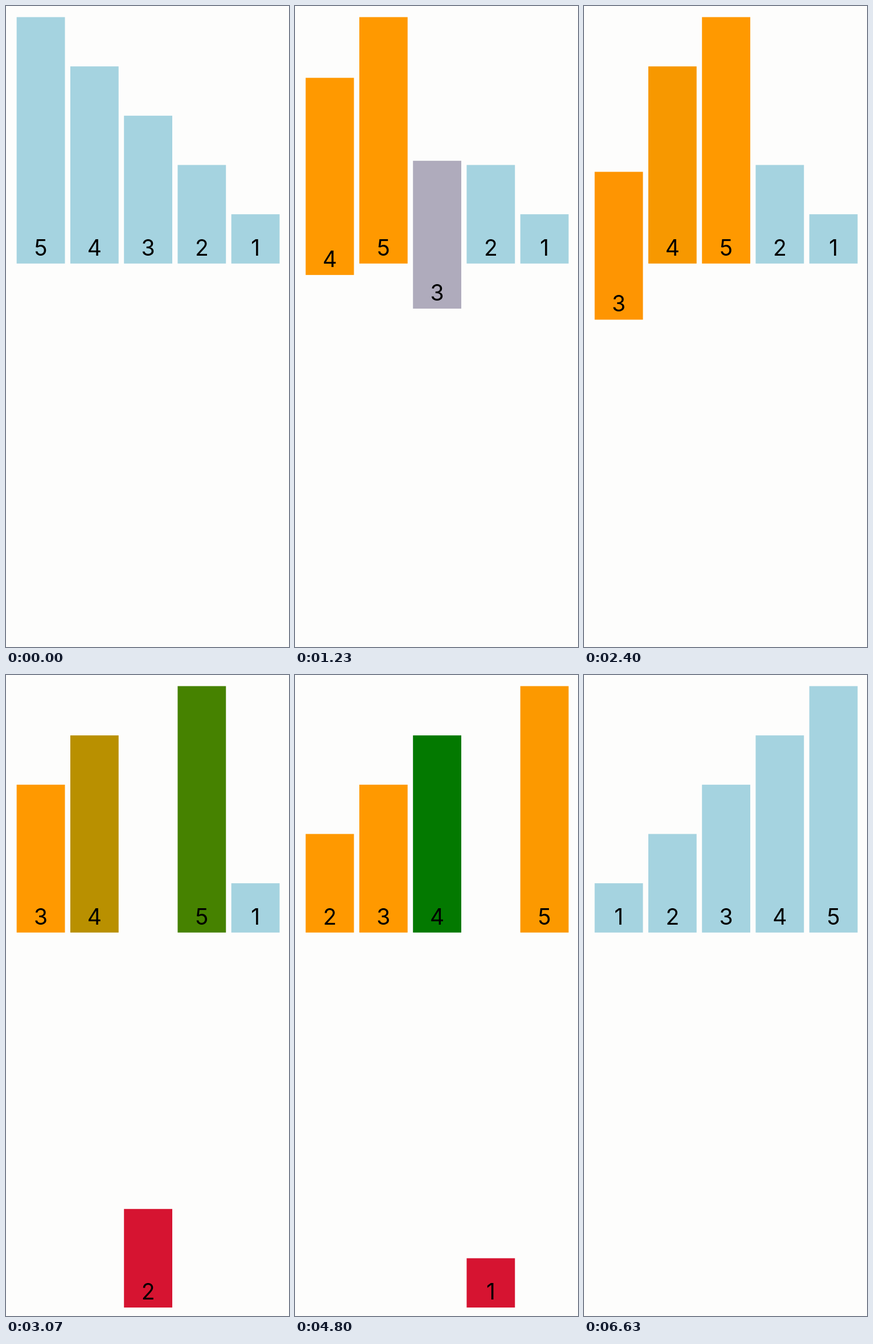
Write an HTML page that moves like this. It is 497 by 1127 pixels and loops after 6.66 s.

```html
<!DOCTYPE html>
<html lang="en">
<head>
<meta charset="utf-8">
<title>Insertion sort</title>
<style>
  html, body { margin: 0; width: 100%; height: 100%; overflow: hidden; background: #fdfdfc; }
  svg { display: block; width: 100%; height: 100%; }
  text { font: 39px Inter, Roboto, sans-serif; text-anchor: middle; }
</style>
</head>
<body>
<svg id="stage" viewBox="0 0 497 1127"></svg>
<script>
const LOOP = 6660;
const LEFT = 18.7, PITCH = 94.25, WIDTH = 84.8, UNIT = 86.65, BASE = 452.8, DROP = 659.3;
const IDLE = [165, 211, 224], KEY = [214, 20, 49], COMPARED = [0, 121, 0], SORTED = [255, 153, 0];
const DURATION = { slot: 210, drop: 320, color: 230 };
// Start and step length of each pass, in ms
const PASSES = [[361, 207], [1194, 206], [2448, 193], [3998, 201.6]];

const svg = document.getElementById("stage");

function add(parent, name, attrs) {
  const el = document.createElementNS("http://www.w3.org/2000/svg", name);
  for (const key in attrs) el.setAttribute(key, attrs[key]);
  return parent.appendChild(el);
}

// cubic-bezier(.25, .1, .25, 1)
function ease(x) {
  if (x <= 0) return 0;
  if (x >= 1) return 1;
  let lo = 0, hi = 1;
  for (let i = 0; i < 24; i++) {
    const s = (lo + hi) / 2, r = 1 - s;
    if (0.75 * r * s + s * s * s < x) lo = s; else hi = s;
  }
  const s = (lo + hi) / 2, r = 1 - s;
  return 0.3 * r * r * s + 3 * r * s * s + s * s * s;
}

function makeBar(value, slot) {
  const group = add(svg, "g", {});
  const height = value * UNIT;
  const rect = add(group, "rect", { y: BASE - height, width: WIDTH, height });
  add(group, "text", { x: WIDTH / 2, y: 438.5 }).textContent = value;
  return {
    value, group, rect,
    start: { slot: [slot], drop: [0], color: IDLE },
    moves: { slot: [], drop: [], color: [] }
  };
}

const bars = [5, 4, 3, 2, 1].map(makeBar);

function change(bar, prop, time, to) {
  bar.moves[prop].push({ time, to: prop === "color" ? to : [to] });
}

// Run the sort once and note every change with its time
function schedule() {
  const row = bars.slice();
  let time = 0;
  PASSES.forEach(([begin, step], n) => {
    let j = n + 1, last = null;
    const key = row[j];
    time = begin;
    change(key, "drop", time, 1);
    change(key, "color", time, KEY);
    time += step;
    while (j > 0 && row[j - 1].value > key.value) {
      const other = row[j - 1];
      if (last) change(last, "color", time, SORTED);
      change(other, "color", time, COMPARED);
      time += step;
      change(other, "slot", time, j);
      change(key, "slot", time, j - 1);
      row[j] = other;
      row[--j] = key;
      last = other;
      time += step;
    }
    change(key, "drop", time, 0);
    change(key, "color", time, SORTED);
    change(last, "color", time, SORTED);
    time += step;
  });
  bars.forEach(bar => change(bar, "color", time, IDLE));
}

function valueAt(bar, prop, t) {
  const moves = bar.moves[prop];
  let now = bar.start[prop];
  moves.forEach(({ time, to }, i) => {
    if (time > t) return;
    const end = i + 1 < moves.length ? Math.min(t, moves[i + 1].time) : t;
    const p = ease((end - time) / DURATION[prop]);
    now = now.map((v, c) => v + (to[c] - v) * p);
  });
  return now;
}

function draw(t) {
  for (const bar of bars) {
    const x = LEFT + PITCH * valueAt(bar, "slot", t)[0];
    const y = DROP * valueAt(bar, "drop", t)[0];
    bar.group.setAttribute("transform", `translate(${x.toFixed(2)} ${y.toFixed(2)})`);
    bar.rect.setAttribute("fill", `rgb(${valueAt(bar, "color", t).map(Math.round)})`);
  }
}

function tick() {
  draw(performance.now() % LOOP);
  requestAnimationFrame(tick);
}

schedule();
tick();
</script>
</body>
</html>
```
